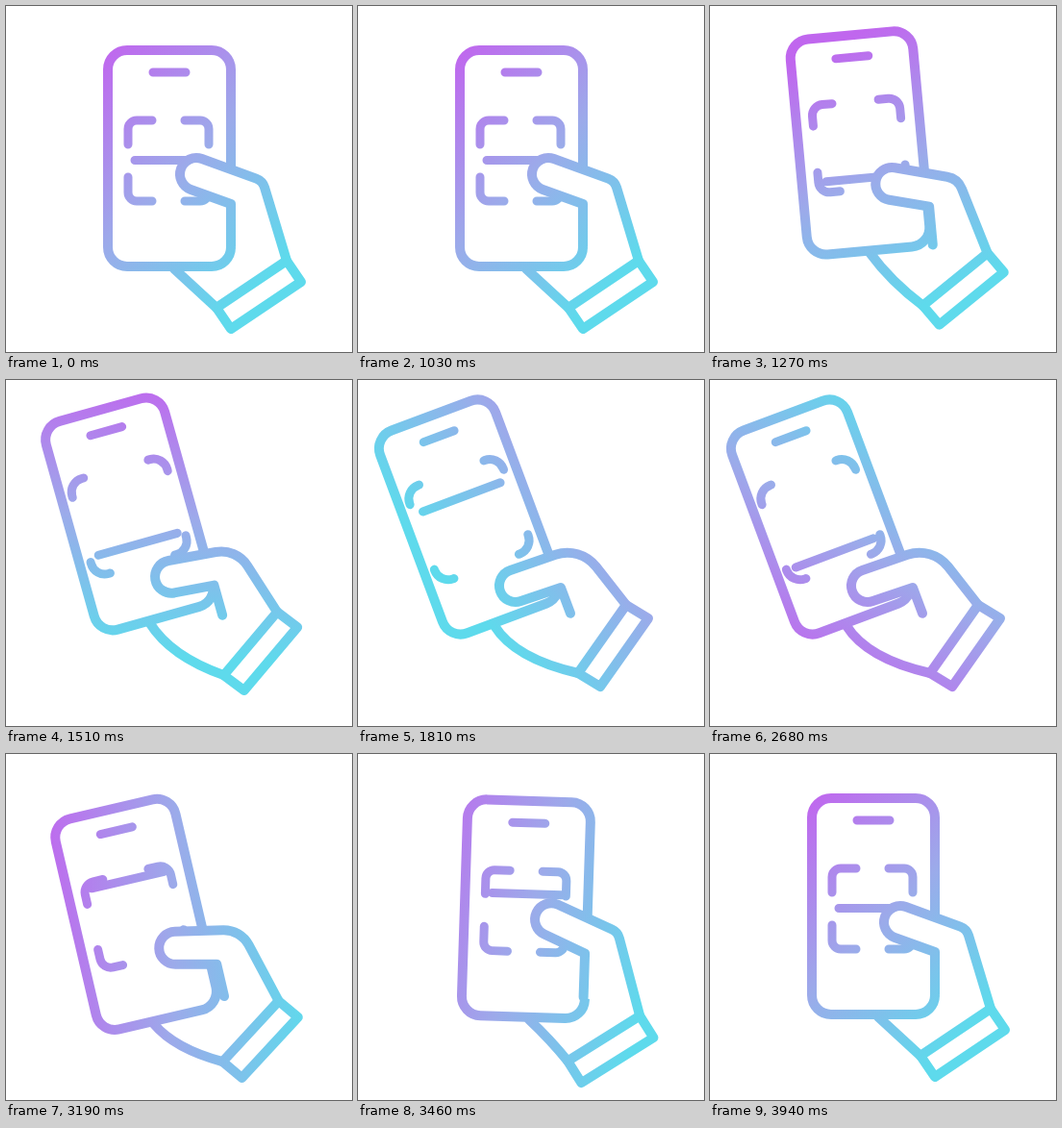
Write an HTML page with a canvas that moves like this. It is 360 by 360 pixels and loops after 3.97 s.

```html
<!DOCTYPE html>
<html lang="en">
<head>
<meta charset="utf-8">
<title>Scan with phone</title>
<style>
html, body { margin: 0; width: 100%; height: 100%; overflow: hidden; background: #fff; }
canvas { display: block; }
</style>
</head>
<body>
<canvas id="stage" width="360" height="360"></canvas>
<script>
const ctx = document.getElementById('stage').getContext('2d');
const { PI, sin, cos, min, max } = Math;
const LOOP = 3970, START = 1030, END = 3940, STEP = 30;
const MAX_TILT = 20.5 * PI / 180, THUMB = 17;

const progress = (t, from, to) => min(max((t - from) / (to - from), 0), 1);
const ease = (...span) => (1 - cos(PI * progress(...span))) / 2;
const arch = (...span) => sin(PI * progress(...span));
const mix = (a, b, k) => a + (b - a) * k;

function poseAt(t) {
  const amount = ease(t, START, 1740) - 1.1 * ease(t, 3000, 3490) + .1 * ease(t, 3490, 3880);
  const tilt = amount * MAX_TILT;
  const cx = mix(170, 115.5, amount);
  const cy = mix(158.5, 142.5, amount)
    - 12.5 * arch(t, START, 1620) + 19.5 * arch(t, 3000, 3470) - 5 * arch(t, 3470, 3880);
  const drop = arch(t, 3000, 3520);
  // each hand point slides from its resting to its tilted place
  const point = (weight, x0, y0, x1, y1) =>
    [mix(x0, x1, amount), mix(y0, y1, amount) + weight * drop];
  return {
    amount, tilt, cx, cy,
    spread: ease(t, START, 1600) - ease(t, 2900, 3400),
    scanY: 2 + 40 * sin(2 * PI * 2 * progress(t, 1060, 3550)),
    cuffTop: point(13, 292, 265, 279, 234),
    cuffRight: point(13, 307, 287, 302, 248),
    cuffLeft: point(13, 219, 314, 229, 305),
    knuckle: point(7, 267, 182, 231, 173),
    thumb: point(2, 198, 175, 164, 214),
    crease: point(7, 234, 206, 211, 216)
  };
}

function stroke(width, path) {
  ctx.lineWidth = width;
  ctx.beginPath();
  path();
  ctx.stroke();
}

function setGradient(t) {
  const x = progress(t, START, END), len = 285;
  const angle = 2 * PI * x + (-135 + 45 * sin(PI * x) ** 2 - 25 * sin(2 * PI * x)) * PI / 180;
  const offset = .48 - .2 * arch(t, 1270, 2680);
  const at = d => [180 + cos(angle) * d, 180 + sin(angle) * d];
  const g = ctx.createLinearGradient(...at(-offset * len), ...at((1 - offset) * len));
  ['#5edaec', '#9caaea', '#c067ee'].forEach((color, i) => g.addColorStop(i / 2, color));
  ctx.strokeStyle = g;
}

// Paths are built in phone space but stroked in stage space, so the gradient stays put
function drawPhone({ tilt, cx, cy, spread, scanY }) {
  const local = path => () => {
    ctx.save();
    ctx.translate(cx, cy);
    ctx.rotate(-tilt);
    path();
    ctx.restore();
  };
  const bar = (half, y) => {
    ctx.moveTo(-half, y);
    ctx.lineTo(half, y);
  };
  stroke(10, local(() => ctx.roundRect(-64, -112.5, 128, 225, 20)));
  stroke(9, local(() => {
    bar(17, -89.5);
    bar(36 + 7 * spread, scanY);
    const half = 42 + 10 * spread, arm = 25 - 9 * spread, r = 9 + 6 * spread;
    for (const sx of [-1, 1]) for (const sy of [-1, 1]) {
      const x = sx * half - 1, y = sy * half + 2.5;
      ctx.moveTo(x, y - sy * arm);
      ctx.arcTo(x, y, x - sx * arm, y, r);
      ctx.lineTo(x - sx * arm, y);
    }
  }));
}

function drawPalm({ amount, tilt, cx, cy, cuffLeft: [bx, by] }) {
  const lx = 5 - 20 * amount, ly = 115;
  const px = cx + lx * cos(tilt) + ly * sin(tilt);
  const py = cy - lx * sin(tilt) + ly * cos(tilt);
  stroke(10, () => {
    ctx.moveTo(px, py);
    ctx.quadraticCurveTo((px + bx) / 2 - 22 * amount, (py + by) / 2 + 10 * amount, bx, by);
  });
}

function drawHand({ amount, tilt, cuffTop, cuffRight, cuffLeft, knuckle, thumb: [mx, my], crease }) {
  // angle at which a line from the point touches the round thumb tip
  const tangent = ([x, y], side) => Math.atan2(y - my, x - mx)
    + side * Math.acos(THUMB / Math.hypot(x - mx, y - my));
  const top = tangent(knuckle, -1), bottom = tangent(crease, 1);
  const tail = 44 - 43 * tilt;
  stroke(10, () => {
    ctx.moveTo(...cuffTop);
    ctx.arcTo(...knuckle, mx + THUMB * cos(top), my + THUMB * sin(top), 14 + 24 * max(amount, 0));
    ctx.arc(mx, my, THUMB, top, bottom, true);
    ctx.lineTo(...crease);
    ctx.lineTo(crease[0] + tail * sin(tilt), crease[1] + tail * cos(tilt));
    ctx.fill();
  });
  stroke(10, () => {
    ctx.moveTo(...cuffTop);
    ctx.lineTo(...cuffRight);
    ctx.lineTo(...cuffRight.map((v, i) => v + cuffLeft[i] - cuffTop[i]));
    ctx.lineTo(...cuffLeft);
    ctx.closePath();
  });
}

function draw(t) {
  const pose = poseAt(t);
  ctx.fillStyle = '#fff';
  ctx.fillRect(0, 0, 360, 360);
  ctx.lineCap = ctx.lineJoin = 'round';
  setGradient(t);
  drawPalm(pose);
  drawPhone(pose);
  drawHand(pose);
}

const begin = performance.now();
function tick() {
  const t = (performance.now() - begin) % LOOP;
  draw(t < START ? 0 : START + Math.floor((t - START) / STEP) * STEP);
  requestAnimationFrame(tick);
}
tick();
</script>
</body>
</html>
```
